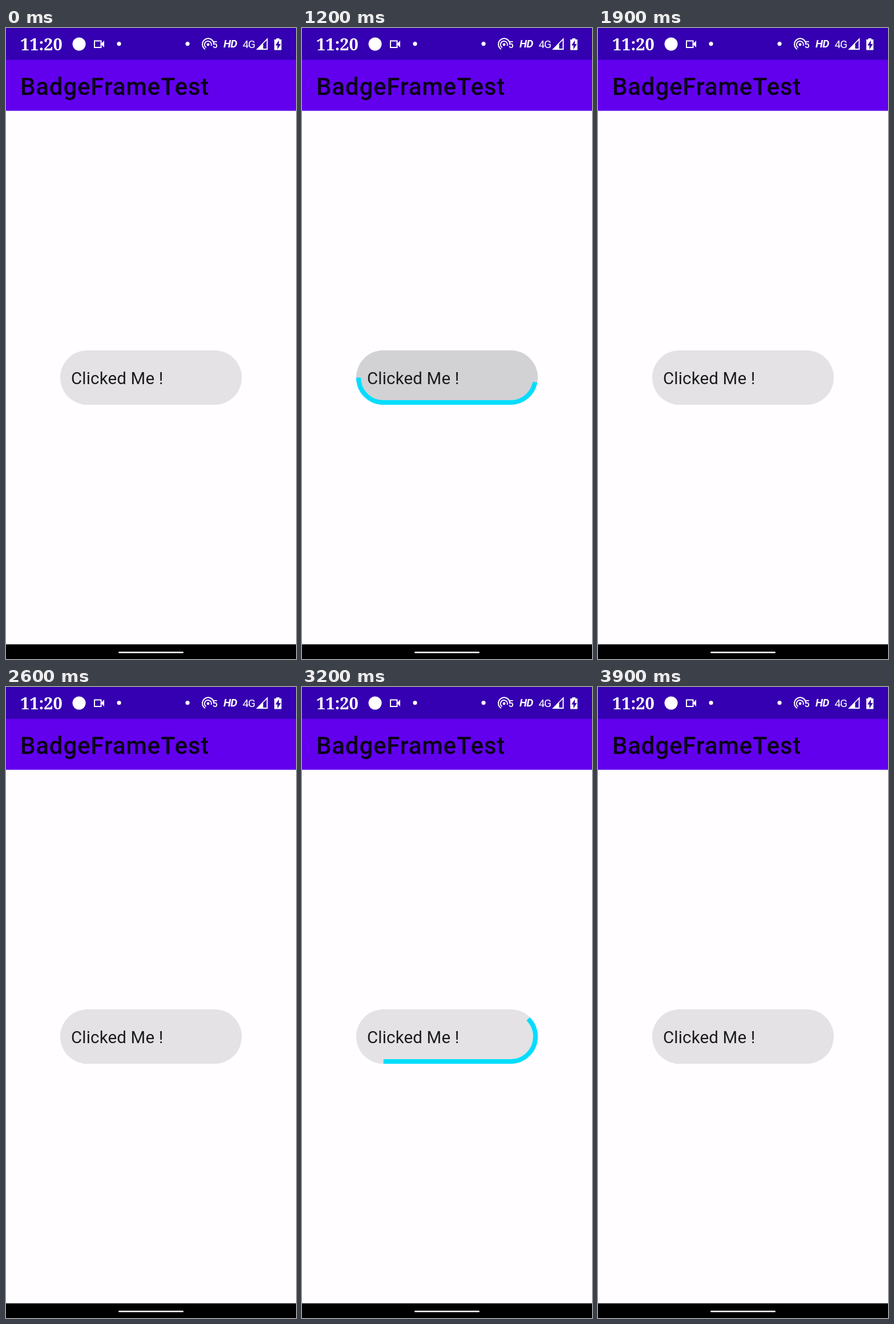
An HTML page that plays this animation: 508x1102 px, repeating every 4000 ms.

```html
<!DOCTYPE html>
<html lang="en">
<head>
<meta charset="utf-8">
<title>Chip with loading border</title>
<style>
  html, body { margin: 0; width: 100%; height: 100%; overflow: hidden; background: #fffdff; }
  svg { display: block; width: 100%; height: 100%; }
  text { font-family: Roboto, sans-serif; }
  .line { fill: none; stroke: #fff; stroke-width: 2; }
</style>
</head>
<body>
<svg viewBox="0 0 508 1102">
  <defs>
    <clipPath id="pill"><rect x="95" y="563" width="318" height="95" rx="47.5"/></clipPath>
  </defs>

  <rect width="508" height="1102" fill="#fffdff"/>
  <rect y="55" width="508" height="89.6" fill="#6200ee"/>
  <rect width="508" height="55.6" fill="#3500b1"/>
  <text x="25" y="117" font-size="42" font-weight="500" letter-spacing=".8" fill="#0b0318">BadgeFrameTest</text>

  <g id="status" fill="#fff">
    <text x="25" y="38.5" font-size="29" font-weight="700" style="font-family:'Noto Serif',serif">11:20</text>
    <circle cx="128" cy="28" r="11.5"/>
    <rect class="line" x="155" y="22.5" width="11.5" height="11.5"/>
    <path d="M167 27l5-5v12l-5-5z"/>
    <circle cx="198" cy="27.6" r="3.6"/>
    <circle cx="318" cy="27.6" r="3.6"/>

    <circle cx="354" cy="29" r="2.4"/>
    <path class="line" d="M350.5 34A6 6 0 1 1 359.500 31M349 37A10 10 0 1 1 364 27"/>
    <text x="361.5" y="35" font-size="16" font-weight="500">5</text>
    <text x="381" y="34" font-size="19" font-weight="700" font-style="italic" letter-spacing="-.8">HD</text>
    <text x="414.5" y="35" font-size="19" letter-spacing="-1.3">4G</text>
    <path d="M438 38L458.500 17V38z"/>
    <path d="M450.500 27.500L456.500 21.500V36H450.500z" fill="#3500b1"/>
    <path d="M473.500 18h5.500v2h3.500v18.500h-12.500v-18.500h3.500z"/>
    <path d="M478 21.500l-6 9h3.500v7l6-9.500h-3.500z" fill="#3500b1"/>
  </g>

  <g clip-path="url(#pill)">
    <rect x="95" y="563" width="318" height="95" fill="#e4e2e5"/>
    <circle id="ripple" cx="331" cy="607" fill="#d2d1d4"/>
  </g>
  <path id="loader" pathLength="1" fill="none" stroke="#00ddff" stroke-width="8"
    d="M99 610.500A43.500 43.500 0 0 0 142.500 654H365.500A43.500 43.500 0 0 0 365.500 567H142.500A43.500 43.500 0 0 0 99 610.500"/>
  <text x="114" y="622" font-size="29.4" letter-spacing=".21" fill="#1b1b1e">Clicked Me !</text>

  <rect y="1076.4" width="508" height="26"/>
  <rect x="197" y="1089.2" width="114" height="2.6" rx="1.3" fill="#fff"/>
</svg>
<script>
  const LOOP = 4000, STEP = 100, LOAD = 560;
  const LOAD_STARTS = [924, 2903];
  const PRESS = 800;
  const ripple = document.getElementById('ripple');
  const loader = document.getElementById('loader');
  const clamp = x => Math.max(0, Math.min(1, x));

  function drawRipple(t) {
    const grow = clamp((t - PRESS) / 250);
    ripple.setAttribute('r', t < PRESS + STEP ? 0 : 35 + 205 * grow);
    ripple.setAttribute('opacity', 1 - clamp((t - 1250) / 250));
  }

  // The head eases round the border; past halfway the tail runs after it.
  function drawLoader(t) {
    const start = LOAD_STARTS.find(s => t >= s && t < s + LOAD);
    loader.style.display = start === undefined ? 'none' : '';
    if (start === undefined) return;
    const head = (1 - Math.cos(Math.PI * (t - start) / LOAD)) / 2;
    const tail = Math.max(0, 2 * head - 1);
    loader.setAttribute('stroke-dasharray', `${head - tail} 2`);
    loader.setAttribute('stroke-dashoffset', -tail);
  }

  function frame() {
    const t = Math.floor(performance.now() % LOOP / STEP) * STEP;
    drawRipple(t);
    drawLoader(t);
    requestAnimationFrame(frame);
  }
  frame();
</script>
</body>
</html>
```
